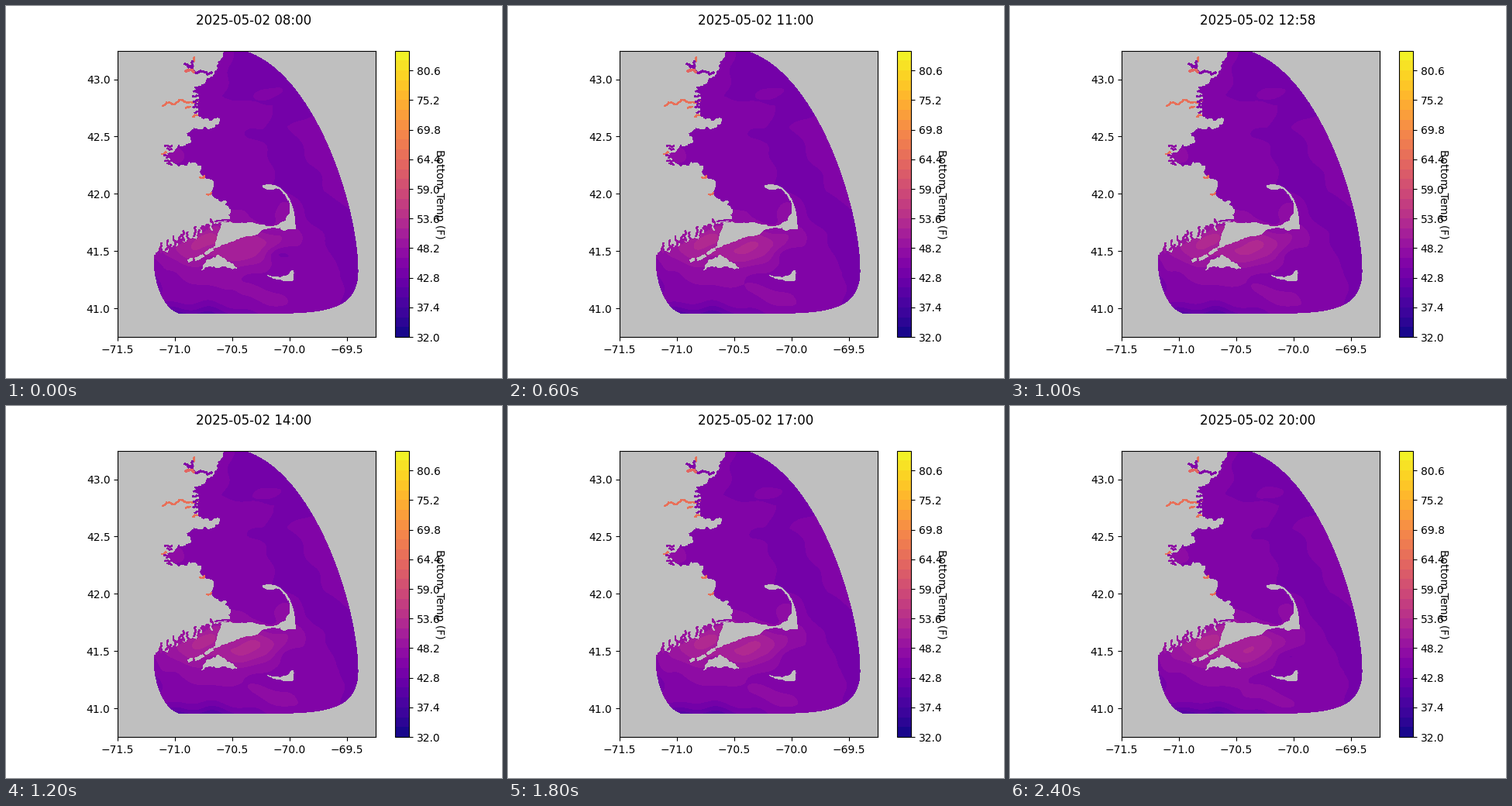
Recreate the animation shown at these times as a matplotlib script. Size 640x480 px, loop 2600 ms.

```python
import numpy as np
import matplotlib.pyplot as plt
from matplotlib.animation import FuncAnimation
from matplotlib.patches import Polygon

FRAMES, INTERVAL = 13, 200
PX_PER_DEG = 147.84
LEVELS = 32 + 1.8 * np.arange(30)
LAND = "#bfbfbf"
rng = np.random.default_rng(5)

fig = plt.figure(figsize=(6.4, 4.8), dpi=100)
ax = fig.add_subplot(facecolor=LAND)
ax.set(xlim=(-71.5, -69.25), ylim=(40.75, 43.25), aspect="equal")
ax.set_autoscale_on(False)
title = fig.suptitle("")


def geo(points):
    """Stage pixels to longitude and latitude."""
    return (np.asarray(points) - [144.16, 57.6]) * [1, -1] / PX_PER_DEG + [-71.5, 43.25]


def bezier(*controls):
    a, b, c, d = np.array(controls, float)
    t = np.linspace(0, 1, 40)[:, None]
    return a * (1 - t)**3 + 3 * b * t * (1 - t)**2 + 3 * c * t**2 * (1 - t) + d * t**3


def rough(points, amp, depth=4):
    """Fractal coastline by midpoint displacement."""
    p = np.array(points, float)
    for _ in range(depth):
        d = np.diff(p, axis=0)
        shift = rng.uniform(-amp, amp, (len(d), 1))
        mid = p[:-1] + d / 2 + d[:, ::-1] * [1, -1] * shift
        p = np.insert(p, range(1, len(p)), mid, axis=0)
    return p


def draw_land(points):
    ax.add_patch(Polygon(geo(points), fc=LAND, ec="none", lw=0, aa=False, zorder=1.5))


# Temperature field, counted in colour bands above 32 F
x, y = np.meshgrid(np.arange(142, 480, 1.5), np.arange(54, 432, 1.5))
lon, lat = np.moveaxis(geo(np.stack([x, y], -1)), -1, 0)


def blob(px, py, cx, cy, rx, ry, tilt=0):
    dx, dy = px - cx, py - cy
    u = dx * np.cos(tilt) + dy * np.sin(tilt)
    v = dy * np.cos(tilt) - dx * np.sin(tilt)
    return np.exp(-(u / rx)**2 - (v / ry)**2)


def temperature(tide, phase):
    px = x + 2.5 * np.sin(y / 6 + phase / 2) + 2 * np.sin((x + y) / 13)
    py = y + 2 * np.sin(x / 8 - phase / 2) + 1.5 * np.sin((x - y) / 11)

    # The cold offshore basin lies between a western and an eastern front
    west = np.interp(py, [58, 118, 128, 165, 228, 262, 305, 345, 375],
                     [294, 277, 342, 333, 346, 384, 402, 432, 432])
    east = np.interp(py, [130, 158, 205, 240, 264], [405, 367, 399, 412, 450])
    east = np.where((py > 130) & (py < 264), east, 500)
    bands = 7 - 0.4 * np.tanh(np.minimum(px - west, east - px) / 15)
    bands += 0.8 * blob(px, py, 338, 113, 19, 8, -0.3)
    bands -= 0.75 * blob(px, py, 319 + 4 * tide, 168, 15 + 3 * tide, 8)

    # Warm sounds and harbours
    bands += 1.3 * blob(px, py, 275, 322, 85, 26)
    bands += (2.6 + 0.4 * tide) * blob(px, py, 316 + 5 * tide, 310, 55, 21, -0.15)
    bands += 2.9 * blob(px, py, 255, 298, 50, 20, -0.45)
    bands += 0.8 * blob(px, py, 262, 352, 30, 10)
    bands += 0.9 * blob(px, py, 335 + 14 * tide, 376, 52, 14, 0.25)
    bands += 1.3 * blob(px, py, 216, 195, 20, 13)
    bands += 0.9 * blob(px, py, 358, 264, 12, 16)

    # Cold inflow by the eastern island and along the southwest edge
    bands -= (1.9 - 0.7 * tide) * blob(px, py, 354 + 8 * tide, 320, 21, 12)
    bands -= 3.5 * blob(px, py, 235 + 10 * tide, 402, 65, 14)
    bands -= 1.8 * blob(px, py, 188, 358, 10, 28)
    return 32 + 1.8 * bands


def draw_field(tide, phase):
    return ax.contourf(lon, lat, temperature(tide, phase), LEVELS, cmap="plasma")


field = draw_field(0, 0)
bar = fig.colorbar(field, ax=ax)
bar.set_label("Bottom Temp (F)", rotation=270)

# Everything outside the model domain
offshore = np.vstack([
    [(284, 50), (300, 50)],
    bezier((308, 57), (400, 85), (455, 260), (455, 340)),
    bezier((455, 340), (456, 390), (420, 397.4), (345, 397.4)),
    bezier((222, 397), (200, 390), (188, 350), (190.5, 322)),
])
south_coast = [(191, 321), (212, 311), (230, 305), (246, 295), (253, 282), (277, 278), (287, 276)]
west_coast = [(287, 276), (288, 262), (283, 251), (265, 239), (267, 226), (251, 206), (222, 207),
              (207, 190), (219, 184), (222, 178), (238, 171), (232, 163), (255, 156), (275, 149),
              (276, 145), (266, 148), (250, 144), (246, 128), (244, 110), (255, 100), (272, 76),
              (281, 58)]
frame = [(140, 45), (140, 435), (485, 435), (485, 45), (140, 45)]
draw_land(np.vstack([frame, offshore, rough(south_coast, 0.45), rough(west_coast, 0.28),
                     offshore[:1], frame[:1]]))

# Peninsula and islands
inner_bay = [(278, 279), (300, 281), (335, 284), (361, 277), (366, 268), (366, 254), (360, 243),
             (350, 235), (340, 237), (331, 233)]
outer_beach = bezier((331, 232), (358, 224), (374, 255), (373, 288))
sound_shore = [(373, 288), (322, 295), (297, 301), (267, 313), (275, 291), (278, 279)]
draw_land(np.vstack([rough(inner_bay[:5], 0.12), rough(inner_bay[5:], 0.12), outer_beach,
                     rough(sound_shore, 0.15)]))
draw_land(rough([(252, 341), (258, 331), (273, 321), (285, 330), (298, 338), (252, 341)], 0.2))
draw_land(rough([(337, 347), (362, 348), (370, 341), (371, 353), (348, 352), (337, 347)], 0.12))
ax.plot(*geo(rough([(267, 314), (235, 329)], 0.1)).T, color=LAND, lw=2, ls=(0, (4, 1.2)),
        aa=False)


def stream(x0, y0, dx, dy, band, width=0.9, amp=0.3):
    line = geo(rough([(x0, y0), (x0 + dx, y0 + dy)], amp))
    color = field.cmap(field.norm(32 + 1.8 * (band + 0.5)))
    ax.plot(*line.T, color=color, lw=width, aa=False)


# Rivers, then small inlets scattered along the shore
stream(247, 122, -24, -1, 18, 1.1, 0.15)
stream(224, 121, -22, 8, 18)
stream(265, 86, -34, -11, 7, 1.4)
stream(240, 77, 3, -6, 7, 1.2)
stream(243, 71, 0, -5, 18)
stream(232, 84, 10, 1, 17, 1.4)
for mouth in [(238, 130), (247, 141), (207, 189), (256, 219), (265, 241)]:
    stream(*mouth, -6, 2, 18)
for px in range(200, 270, 6):
    stream(px, 318 - 0.5 * (px - 200), rng.uniform(-3, 3), -rng.uniform(4, 14), 9, 1)
for py in range(106, 138, 5):
    stream(247, py, -rng.uniform(2, 6), rng.uniform(-3, 3), 7, 1)
for py in range(180, 206, 5):
    stream(214, py, -rng.uniform(5, 11), rng.uniform(-3, 3), 8, 1)
stream(270, 278, 17, -2, 8, 0.9, 0.05)


def update(i):
    global field
    # Model time is stored in steps of 1/256 day
    minutes = 480 + int(round(i * 256 / 24) * 1440 / 256)
    title.set_text(f"2025-05-02 {minutes // 60:02d}:{minutes % 60:02d}")
    angle = np.pi * i / FRAMES
    field.remove()
    field = draw_field(np.sin(angle), angle)
    return title, field


anim = FuncAnimation(fig, update, frames=FRAMES, interval=INTERVAL, repeat=True, repeat_delay=0)
plt.show()
```
